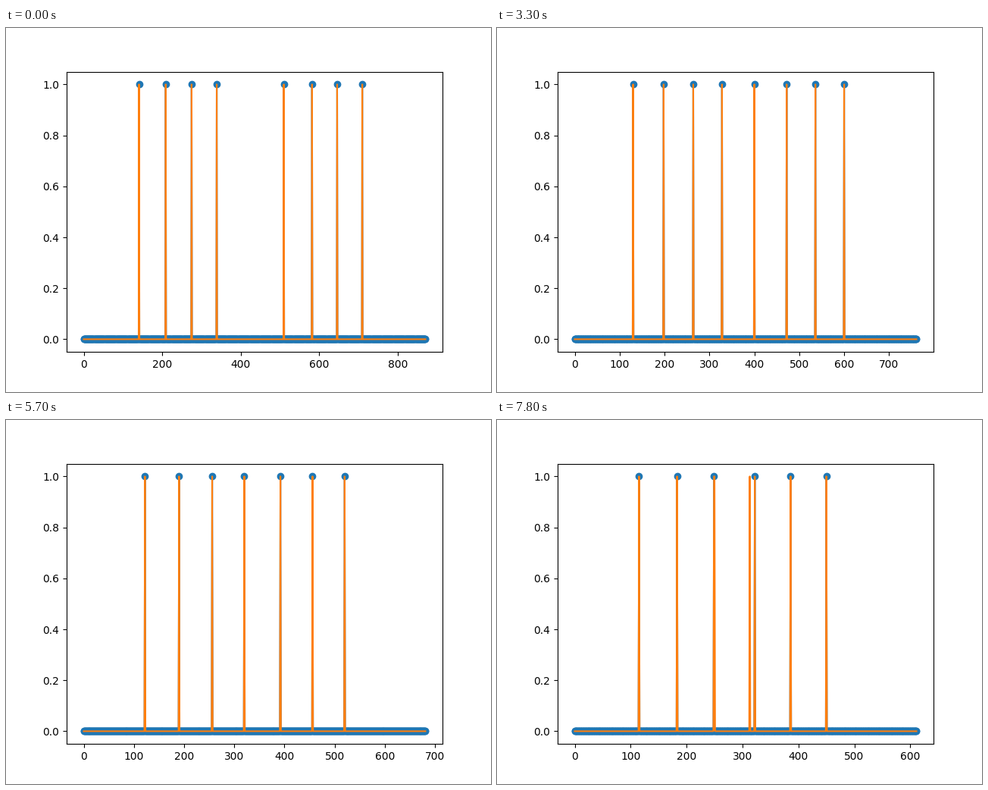
A matplotlib script for the animation above (8000 ms loop, 640 by 480 pixels).

```python
import numpy as np
import matplotlib.pyplot as plt
from matplotlib.animation import FuncAnimation

INTERVAL = 100       # ms per tick
TICKS_PER_STEP = 3   # the signal changes every 300 ms
TICKS = 80
MIN_GAP = 50         # closer peaks are merged into the later one

SLOW = np.array([141, 209, 275, 339])   # drift left by 1 per step
FAST = np.array([510, 582, 646, 710])   # drift left by 10 per step
END = 871

fig, ax = plt.subplots(figsize=(6.4, 4.8), dpi=100)


def spikes(positions, size):
    signal = np.zeros(size)
    signal[list(positions)] = 1
    return signal


def thin_out(positions):
    """Keep peaks from right to left, dropping any too close to a kept one."""
    peaks = sorted(set(positions))
    # two neighbouring samples form one flat peak, placed at its left sample
    peaks = [p for p in peaks if p - 1 not in peaks]
    kept = []
    for p in reversed(peaks):
        if not kept or kept[-1] - p >= MIN_GAP:
            kept.append(p)
    return kept


def draw(tick):
    step = tick // TICKS_PER_STEP
    size = END - 10 * step + 1
    positions = [*(SLOW - step), *(FAST - 10 * step)]
    ax.clear()
    ax.plot(spikes(thin_out(positions), size), "o-", color="tab:blue")
    ax.plot(spikes(positions, size), color="tab:orange")
    return ax.lines


anim = FuncAnimation(fig, draw, frames=TICKS, interval=INTERVAL,
                     init_func=lambda: draw(0), repeat=True, repeat_delay=0)
plt.show()
```
